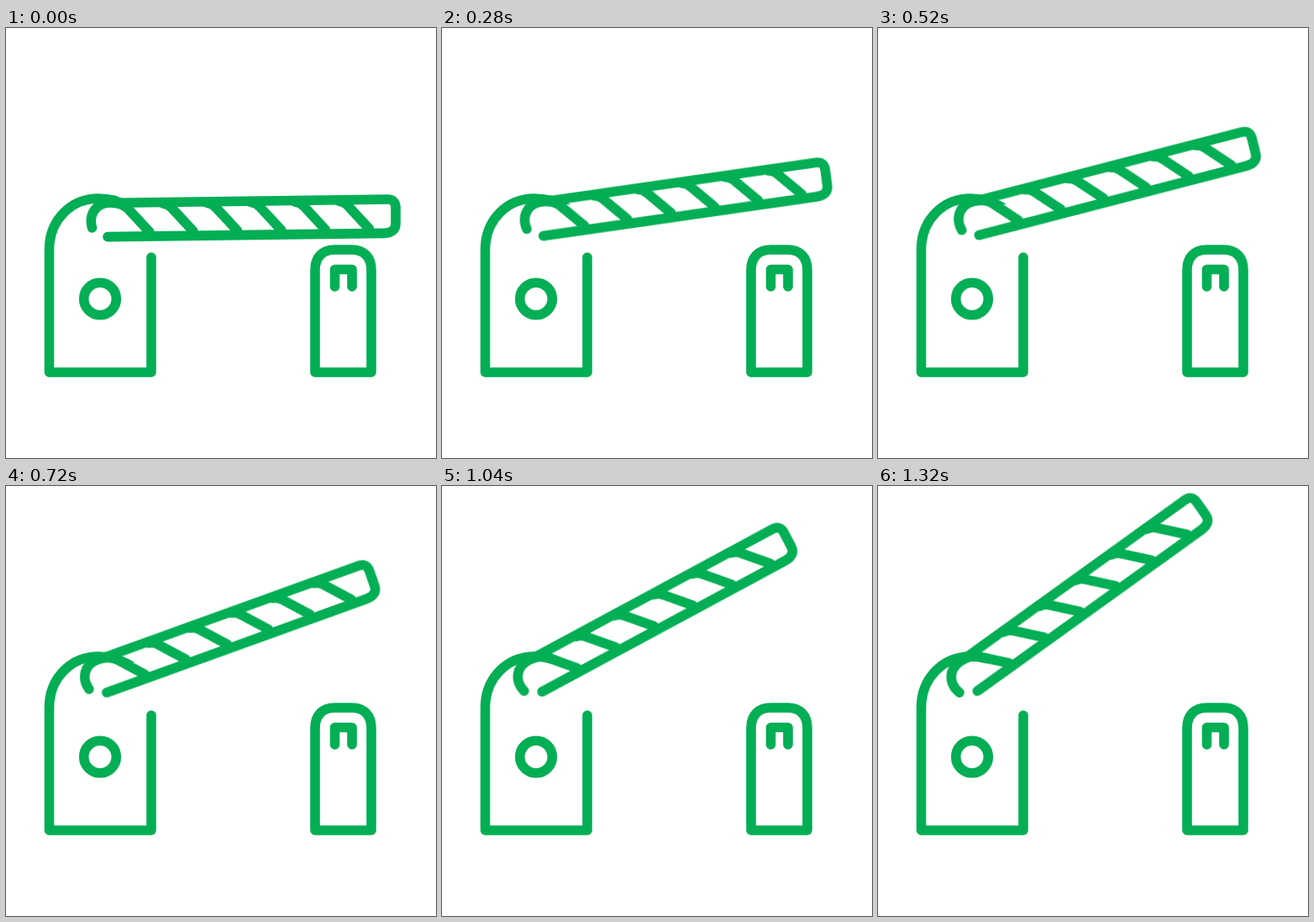
Animation, 512 px wide and 512 px high, one loop 1.36 s. Source, as an HTML page without scripts:

```html
<!DOCTYPE html>
<html lang="en">
<head>
<meta charset="utf-8">
<title>Barrier gate</title>
<style>
  html, body { margin: 0; width: 100%; height: 100%; overflow: hidden; background: #fff; }
  svg { display: block; width: 100vw; height: 100vh; }
  .line {
    fill: none;
    stroke: #03ae54;
    stroke-width: 11.6;
    stroke-linecap: round;
    stroke-linejoin: round;
  }
  .tail { fill: #03ae54; stroke: none; }
  .arm {
    transform-origin: 112.6px 250.7px;
    animation: lift 1360ms steps(34) infinite;
  }
  /* 34 equal steps; the last visible pose is 35 degrees */
  @keyframes lift {
    from { transform: rotate(0deg); }
    to { transform: rotate(-36.06deg); }
  }
</style>
</head>
<body>
<svg viewBox="0 0 512 512">
  <defs>
    <path id="stripe" d="M187 209Q194 210 198 215L223 242"/>
  </defs>
  <g class="line">
    <!-- cabinet -->
    <path d="M173 273V410H51.5V264C51.5 228 78 203 110 203Q120 203 130 205.5"/>
    <path class="tail" d="M128 199.5Q142 203 153 210L128 211Z"/>
    <circle cx="112" cy="322.5" r="19.3"/>

    <!-- post -->
    <path d="M368 410V288C368 273 377 264 391 264H412C426 264 435 273 435 288V410Z"/>
    <path d="M391.5 308V287.5H412V308"/>

    <!-- arm -->
    <g class="arm">
      <path d="M121 248.6L450 244.4Q464 244 464 233V214Q464 204 454 204L130 208.2"/>
      <path d="M102.5 238C98 222 107 208 124 208Q138 208 146 216L171 243"/>
      <use href="#stripe"/>
      <use href="#stripe" x="52.4" y="-.7"/>
      <use href="#stripe" x="104.8" y="-1.4"/>
      <use href="#stripe" x="157.2" y="-2.1"/>
      <use href="#stripe" x="209.6" y="-2.8"/>
    </g>
  </g>
</svg>
</body>
</html>
```
